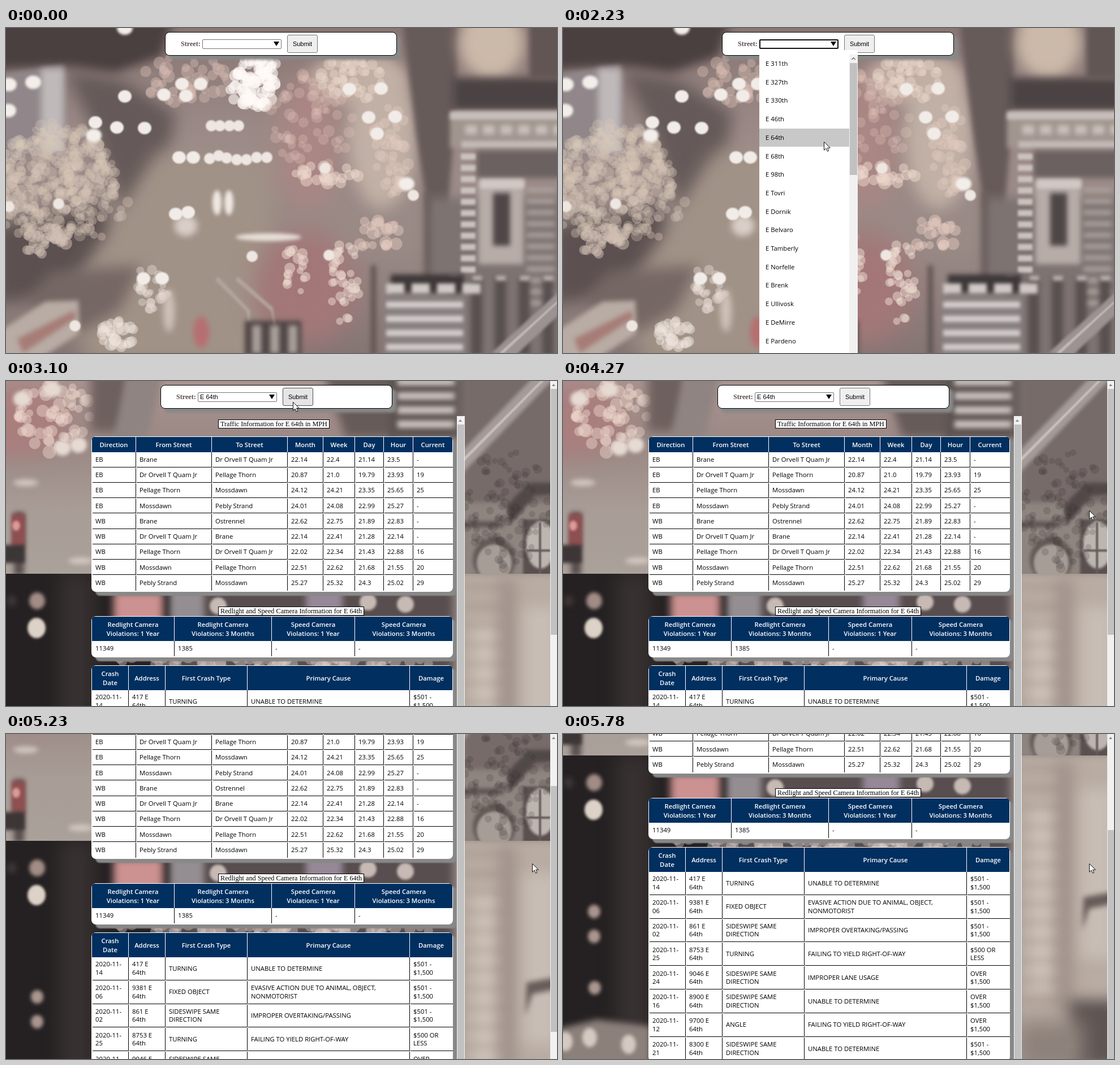
Recreate the animation shown at these times as an HTML page with a canvas. Size 974 by 575 pixels, loop 8000 ms.

```html
<!DOCTYPE html>
<html lang="en">
<head>
<meta charset="utf-8">
<title>Street traffic</title>
<style>
html, body { margin: 0; width: 100%; height: 100%; overflow: hidden; }
#stage { position: relative; width: 974px; height: 575px; overflow: hidden; background: #8d7f7d; font: 11.3px "Open Sans", "Noto Sans", sans-serif; color: #000; }
#stage div, #stage canvas, #stage svg { position: absolute; box-sizing: border-box; }
#page { left: 0; top: 0; width: 974px; height: 880px; }
#form { left: 0; top: 0; }
.panel { left: 281px; top: 7px; width: 410px; height: 42px; background: #fff; border: 1px solid #000; border-radius: 8px; box-shadow: 7px 7px 4px #888; }
.label { left: 309px; top: 20px; font: bold 12.1px/17px "Liberation Serif", serif; color: #5c4a4d; }
#select { left: 347px; top: 20px; width: 140px; height: 17px; border: 1px solid #767676; border-radius: 2px; background: #fff; padding-left: 3px; font: 11px/15px "Liberation Sans", sans-serif; }
#select.hover { border-color: #444; }
#select.focus { border: 2px solid #101010; padding-left: 2px; line-height: 13px; }
.down { left: 473px; top: 24px; border: 5.5px solid transparent; border-top: 8px solid #000; border-bottom: 0; }
#submit { left: 497px; top: 12px; width: 54px; height: 32px; border: 1px solid #767676; border-radius: 3px; background: #efefef; text-align: center; font: 11px/30px "Liberation Sans", sans-serif; }
#submit.hover { background: #e5e5e5; border-color: #4f4f4f; }
#submit.active { background: #f5f5f5; border-color: #8d8d8d; }
#list { left: 347px; top: 39px; width: 174px; height: 536px; background: #fff; }
.item { left: 0; width: 159px; height: 32.7px; padding-left: 11px; line-height: 32.7px; white-space: pre; }
.item.on { background: #c8c8c8; }
.title { left: 375px; height: 16px; border: 1px solid #000; background: #fff; padding: 0 3px; font: 12.2px/14px "Liberation Serif", serif; white-space: nowrap; }
.table { left: 151px; width: 639px; background: #fff; border-radius: 8px; overflow: hidden; box-shadow: 7px 7px 2px #888; }
.cell { display: flex; align-items: center; white-space: pre; line-height: 14.5px; padding-left: 5px; border: 0 solid #000; }
.head { justify-content: center; text-align: center; padding: 0; background: #002f60; color: #fff; font-weight: 600; line-height: 15.5px; }
.up { border: 3.5px solid transparent; border-bottom: 4px solid #8a8a8a; border-top: 0; }
.track { background: #f1f1f1; }
.thumb { background: #c1c1c1; }
</style>
</head>
<body>
<div id="stage">
  <canvas id="night" width="974" height="575"></canvas>
  <canvas id="tiled" width="974" height="880"></canvas>
  <div id="page">
    <div id="results"></div>
    <div id="form">
      <div class="panel"></div>
      <div class="label">Street:</div>
      <div id="select"></div>
      <div class="down"></div>
      <div id="submit">Submit</div>
    </div>
  </div>
  <div id="list"></div>
  <div id="bar" class="track" style="left:962px;top:0;width:12px;height:575px">
    <div class="up" style="left:3px;top:5px"></div>
    <div id="thumb" class="thumb" style="left:1px;width:11px;height:435px"></div>
  </div>
  <svg id="arrow" width="14" height="20" style="overflow:visible"><path d="M.5 .5V15.2L4 12L6.4 17.2L8.8 16.1L6.5 11.1H11.3Z" fill="#fff" stroke="#111"/></svg>
  <svg id="beam" width="10" height="16" style="overflow:visible"><g fill="none"><path id="stem" d="M-3-7Q0-7 0-5Q0-7 3-7M0-5V5M-3 7Q0 7 0 5Q0 7 3 7" stroke="#fff" stroke-width="3"/><use href="#stem" style="stroke:#000"/><path d="M-3-7Q0-7 0-5Q0-7 3-7M0-5V5M-3 7Q0 7 0 5Q0 7 3 7" stroke="#000"/></g></svg>
</div>
<script>
const $ = id => document.getElementById(id);
const STREET = 'E 64th';

// ---------- backdrops ----------
let g, seed = 7;
const rnd = () => (seed = seed * 16807 % 2147483647) / 2147483647;

function poly(blur, color, ...p) {
  g.filter = blur ? `blur(${blur}px)` : 'none';
  g.fillStyle = color;
  g.beginPath();
  for (let i = 0; i < p.length; i += 2) g.lineTo(p[i], p[i + 1]);
  g.fill();
}
const box = (blur, color, x, y, w, h) => poly(blur, color, x, y, x + w, y, x + w, y + h, x, y + h);
function discs(blur, color, rx, ry, ...p) {
  g.filter = blur ? `blur(${blur}px)` : 'none';
  g.fillStyle = color;
  for (let i = 0; i < p.length; i += 2) {
    g.beginPath();
    g.ellipse(p[i], p[i + 1], rx, ry, 0, 0, 7);
    g.fill();
  }
}
function scatter(n, color, x, y, w, h, r) {
  for (let i = 0; i < n; i++) {
    const a = rnd() * 6.283, d = Math.sqrt(rnd()), s = r * (.6 + .5 * rnd());
    discs(0, color, s, s, x + w * d * Math.cos(a), y + h * d * Math.sin(a));
  }
}
function base(h, ...colors) {
  const grad = g.createLinearGradient(0, 0, 0, h);
  colors.forEach((c, i) => grad.addColorStop(i / (colors.length - 1), c));
  g.filter = 'none';
  g.fillStyle = grad;
  g.fillRect(0, 0, 974, h);
}

function paintNight() {
  g = $('night').getContext('2d');
  base(575, '#887673', '#9c8b88', '#9a8a86', '#857573');
  // left side
  poly(9, '#4a4040', -30, -30, 300, -30, 275, 50, 190, 80, 105, 68, -30, 75);
  poly(14, '#655a59', 105, 75, 200, 90, 300, 150, 290, 210, 210, 330, 150, 170);
  poly(4, '#91878a', -9, 82, 102, 66, 104, 210, -9, 240);
  box(6, '#bfb9ba', 62, 72, 40, 150);
  poly(14, '#5c5150', -20, 350, 180, 310, 190, 370, 110, 470, -20, 490);
  // road
  poly(18, '#a19287', 270, 220, 480, 230, 450, 600, 150, 600, 100, 500);
  poly(12, '#756764', 80, 430, 240, 420, 200, 500, 130, 540, 40, 480);
  discs(22, '#aa8684', 55, 120, 535, 200);
  discs(22, '#a37778', 90, 100, 530, 460);
  discs(12, '#c3aca2', 85, 45, 620, 90);
  discs(14, '#c1b0a5', 60, 130, 665, 190);
  // right side
  poly(5, '#675b5a', 700, -20, 800, -20, 795, 150, 780, 330, 745, 320, 725, 190);
  discs(12, '#cbb9a9', 58, 65, 858, 25);
  box(7, '#4b4343', 790, 88, 200, 58);
  box(5, '#625655', 925, -20, 60, 110);
  box(9, '#7d7371', 740, 300, 250, 290);
  box(5, '#a1968f', 785, 148, 200, 64);
  box(3, '#c8bfbc', 785, 148, 200, 14);
  box(3, '#c4bab7', 805, 200, 180, 12);
  for (let x = 812; x < 974; x += 31) box(4, '#cabfba', x, 172, 21, 16);
  box(5, '#6b6160', 832, 217, 150, 48);
  box(5, '#b7aca8', 835, 268, 80, 150);
  box(3, '#d1c8c5', 838, 268, 78, 16);
  box(4, '#4f4747', 861, 292, 30, 93);
  for (let y = 222; y < 425; y += 20) {
    box(2, '#cbc2bf', 804, y, 26, 11);
    box(4, '#aaa09d', 920, y + 60, 50, 9);
  }
  for (let x = 780; x < 960; x += 42) {
    box(4, '#595050', x, 440, 20, 140);
    box(3, '#bdb2ae', x + 2, 438, 18, 9);
  }
  box(5, '#6c605e', 740, 290, 12, 160);
  box(4, '#5e5351', 645, 420, 9, 160);
  box(5, '#898080', 670, 470, 142, 120);
  box(4, '#3e3838', 680, 436, 130, 32);
  for (let x = 672; x < 815; x += 45) box(3, '#cfc8c5', x, 452, 32, 18);
  for (let y = 484; y < 575; y += 25) box(3, '#d2ccca', 672, y, 136, 11);
  poly(2, '#9c9292', 858, 575, 980, 464, 980, 505, 900, 580);
  poly(1, '#c2b9b8', 872, 575, 980, 478, 980, 482, 880, 575);
  // lower foreground
  poly(4, '#b8aca4', -9, 535, 70, 484, 128, 482, 130, 540, 60, 585, -9, 585);
  poly(4, '#a67c76', 20, 550, 120, 500, 125, 512, 30, 575);
  box(4, '#504646', 422, 518, 100, 62);
  for (let x = 435; x < 520; x += 32) box(4, '#aaa09b', x, 526, 16, 50);
  discs(5, '#b66f70', 14, 28, 345, 538);
  poly(2, '#b3a59f', 375, 440, 432, 500, 430, 520, 424, 500, 370, 446);
  poly(2, '#b3a59f', 410, 440, 472, 495, 476, 530, 468, 500, 405, 446);
  // lights
  scatter(330, 'rgba(218,202,187,.3)', 90, 272, 105, 105, 10);
  scatter(90, 'rgba(208,190,177,.4)', 100, 300, 118, 92, 9);
  scatter(26, 'rgba(210,192,180,.5)', 65, 375, 50, 25, 10);
  scatter(45, 'rgba(218,190,180,.4)', 310, 90, 85, 45, 11);
  scatter(55, 'rgba(255,250,247,.6)', 437, 105, 44, 36, 12);
  scatter(25, 'rgba(255,250,247,.5)', 440, 66, 40, 12, 9);
  scatter(60, 'rgba(225,195,187,.3)', 540, 165, 75, 85, 10);
  scatter(45, 'rgba(232,214,202,.45)', 610, 90, 55, 45, 10);
  scatter(45, 'rgba(225,203,190,.4)', 680, 220, 35, 80, 10);
  scatter(22, 'rgba(238,215,203,.5)', 570, 260, 70, 20, 11);
  scatter(35, 'rgba(238,220,208,.5)', 598, 450, 28, 72, 9);
  scatter(18, 'rgba(238,220,208,.5)', 512, 430, 24, 42, 9);
  scatter(22, 'rgba(230,205,193,.45)', 655, 365, 42, 30, 11);
  scatter(30, 'rgba(235,225,218,.4)', 258, 460, 32, 42, 9);
  scatter(24, 'rgba(240,230,222,.5)', 196, 545, 32, 28, 11);
  discs(6, '#d9cfc8', 20, 18, 318, 350);
  discs(3, '#e6ddd6', 58, 7, 464, 370);
  discs(6, '#cfc2b9', 10, 38, 288, 500);
  discs(3, '#eee7e2', 8, 22, 373, 309, 394, 309);
  discs(1, '#f2ece8', 12, 11, 210, 121, 279, 118, 318, 120, 311, 99, 344, 99, 158, 167, 196, 176, 245, 177,
    663, 107, 641, 158, 688, 157, 656, 187, 607, 108, 306, 229, 331, 229, 276, 443, 243, 443, 300, 329, 322, 326);
  discs(1, '#eee6e1', 10, 10, 363, 173, 378, 173, 395, 173, 411, 173, 360, 231, 376, 226, 390, 230, 408, 233, 425, 233,
    443, 229, 461, 229, 564, 248, 435, 404, 571, 402, 720, 296, 5, 316, 93, 311, 122, 527);
  discs(2, '#f3eeea', 14, 12, 5, 100, 48, 96, 4, 146, 155, 190, 708, 276, 210, 0);
}

function paintTiled() {
  g = $('tiled').getContext('2d');
  // lower end of the photo
  base(341, '#a8938f', '#9a8884', '#a89c96', '#aaa19a');
  discs(18, '#a97f7e', 95, 65, 20, 70);
  scatter(55, 'rgba(238,215,205,.45)', 85, 60, 65, 70, 11);
  discs(3, '#e6dad3', 15, 14, 28, 32, 100, 118, 128, 113, 82, 15);
  box(9, '#6d605e', 150, -20, 70, 110);
  poly(8, '#665b59', 560, -20, 690, -20, 690, 100, 600, 100);
  poly(6, '#8f8481', 215, -20, 280, -20, 250, 100, 190, 100);
  box(4, '#5e5553', 675, -20, 140, 120);
  for (let y = -5; y < 95; y += 25) box(4, '#cac2be', 692, y, 102, 13);
  poly(10, '#776b69', 800, -20, 980, -20, 980, 360, 800, 360);
  poly(3, '#a59b98', 805, 125, 935, -10, 974, -10, 805, 165);
  poly(1, '#cbc3c0', 805, 140, 950, -5, 955, -5, 805, 147);
  box(5, '#8f8580', 805, 215, 160, 130);
  poly(3, '#514948', 885, 220, 925, 180, 975, 180, 975, 200, 935, 203, 890, 255);
  box(3, '#605654', 805, 248, 75, 11);
  discs(3, '#635957', 38, 40, 863, 316);
  discs(2, '#a69d97', 31, 33, 863, 322);
  box(2, '#5a504f', 914, 245, 50, 100);
  discs(2, '#bcb5b0', 26, 42, 945, 290);
  box(1, '#655d5b', 942, 250, 4, 95);
  box(1, '#655d5b', 920, 298, 42, 4);
  scatter(90, 'rgba(50,43,42,.18)', 890, 225, 80, 110, 8);
  box(5, '#594f4e', 14, 232, 18, 112);
  box(3, '#8e4f50', 10, 235, 24, 58);
  discs(2, '#dc9b98', 7, 9, 18, 256);
  box(3, '#3d3636', -5, 290, 38, 32);
  discs(4, '#d2c8c0', 22, 6, 35, 180, 132, 318);
  // next repeat starts here
  g.save();
  g.beginPath();
  g.rect(0, 341, 974, 539);
  g.clip();
  box(0, '#252122', 0, 341, 974, 539);
  box(15, '#383131', 95, 341, 60, 539);
  box(9, '#584e4f', 300, 320, 520, 220);
  box(7, '#cc9291', 190, 372, 88, 60);
  box(6, '#948d92', 290, 365, 60, 60);
  box(6, '#968897', 530, 365, 65, 60);
  discs(2, '#c7bab4', 15, 15, 375, 398, 640, 391, 706, 395);
  scatter(65, 'rgba(225,205,198,.4)', 480, 493, 310, 16, 13);
  box(10, '#b9aca3', 795, 330, 200, 570);
  box(14, '#cec3b9', 825, 430, 45, 330);
  box(13, '#9e918a', 874, 350, 28, 450);
  box(12, '#c7bdb4', 915, 400, 60, 300);
  poly(5, '#675c59', 920, 592, 975, 582, 975, 603, 930, 612, 918, 650);
  box(12, '#5e5452', 895, 773, 90, 120);
  box(18, '#8d817b', 800, 810, 120, 90);
  for (let y = 360; y < 800; y += 34) box(8, 'rgba(120,105,98,.25)', 810, y, 70, 9);
  discs(3, '#a28c86', 14, 15, 55, 389);
  discs(2, '#ddd2c7', 16, 18, 54, 437);
  discs(3, '#aa968f', 11, 12, 55, 617, 55, 661, 56, 752);
  discs(4, '#3c3535', 9, 10, 10, 389);
  poly(6, '#8c807b', -10, 825, 60, 808, 155, 820, 155, 900, -10, 900);
  discs(3, '#d5cac2', 13, 17, 4, 847, 47, 840, 116, 852);
  g.restore();
}

// ---------- page content ----------
function add(parent, cls, style, text = '') {
  const el = document.createElement('div');
  el.className = cls;
  for (const k in style) el.style[k] = typeof style[k] === 'number' ? style[k] + 'px' : style[k];
  el.textContent = text;
  parent.append(el);
  return el;
}

function table(top, edges, headH, rowH, head, rows) {
  const t = add($('results'), 'table', { top, height: 2 + headH + rows.length * rowH });
  const last = head.length - 1;
  head.forEach((text, c) => add(t, 'cell head',
    { left: edges[c] - 151, top: 1, width: edges[c + 1] - edges[c] - 1, height: headH }, text));
  rows.forEach((row, r) => row.forEach((text, c) => add(t, 'cell', {
    left: edges[c] - 150, top: 1 + headH + r * rowH,
    width: edges[c + 1] - edges[c] - 1, height: rowH - 1,
    borderRightWidth: c < last ? 1 : 0, borderBottomWidth: r < rows.length - 1 ? 1 : 0
  }, text)));
}

const KING = 'Dr Orvell T Quam Jr', GROVE = 'Pellage Thorn', LAWN = 'Mossdawn', STONY = 'Pebly Strand', MAIN = 'Brane';
const split = lines => lines.map(s => s.split('|'));

function buildResults() {
  add($('results'), 'title', { top: 68 }, `Traffic Information for ${STREET} in MPH`);
  table(98, [152, 230, 364, 498, 561, 617, 668, 720, 790], 27.4, 27.25,
    ['Direction', 'From Street', 'To Street', 'Month', 'Week', 'Day', 'Hour', 'Current'],
    split([
      `EB|${MAIN}|${KING}|22.14|22.4|21.14|23.5|-`,
      `EB|${KING}|${GROVE}|20.87|21.0|19.79|23.93|19`,
      `EB|${GROVE}|${LAWN}|24.12|24.21|23.35|25.65|25`,
      `EB|${LAWN}|${STONY}|24.01|24.08|22.99|25.27|-`,
      `WB|${MAIN}|Ostrennel|22.62|22.75|21.89|22.83|-`,
      `WB|${KING}|${MAIN}|22.14|22.41|21.28|22.14|-`,
      `WB|${GROVE}|${KING}|22.02|22.34|21.43|22.88|16`,
      `WB|${LAWN}|${GROVE}|22.51|22.62|21.68|21.55|20`,
      `WB|${STONY}|${LAWN}|25.27|25.32|24.3|25.02|29`
    ]));
  add($('results'), 'title', { top: 399 }, `Redlight and Speed Camera Information for ${STREET}`);
  table(416, [152, 298, 470, 617, 790], 43, 27.5,
    ['Redlight Camera\nViolations: 1 Year', 'Redlight Camera\nViolations: 3 Months',
      'Speed Camera\nViolations: 1 Year', 'Speed Camera\nViolations: 3 Months'],
    split(['11349|1385|-|-']));
  const swipe = 'SIDESWIPE SAME\nDIRECTION', mid = '$501 -\n$1,500', over = 'OVER\n$1,500';
  const crashes = split([
    `14|417|TURNING|UNABLE TO DETERMINE|${mid}`,
    `06|9381|FIXED OBJECT|EVASIVE ACTION DUE TO ANIMAL, OBJECT,\nNONMOTORIST|${mid}`,
    `02|861|${swipe}|IMPROPER OVERTAKING/PASSING|${mid}`,
    `25|8753|TURNING|FAILING TO YIELD RIGHT-OF-WAY|$500 OR\nLESS`,
    `24|9046|${swipe}|IMPROPER LANE USAGE|${over}`,
    `16|8900|${swipe}|UNABLE TO DETERMINE|${over}`,
    `12|9700|ANGLE|FAILING TO YIELD RIGHT-OF-WAY|${over}`,
    `21|8300|${swipe}|UNABLE TO DETERMINE|${mid}`
  ]).map(([day, no, ...rest]) => ['2020-11-\n' + day, `${no} ${STREET.replace(' ', '\n')}`, ...rest]);
  table(503, [152, 217, 282, 427, 714, 790], 43, 41.8,
    ['Crash\nDate', 'Address', 'First Crash Type', 'Primary Cause', 'Damage'], crashes);
  const bar = add($('results'), 'track', { left: 797, top: 62, width: 14, height: 818 });
  add(bar, 'up', { left: 3, top: 6 });
  add(bar, 'thumb', { left: 1, top: 15, width: 12, height: 803 });
}

const ROW = 32.7, LIST_TOP = 47;
const items = ['311th', '327th', '330th', '46th', '64th', '68th', '98th', 'Tovri', 'Dornik', 'Belvaro', 'Tamberly',
  'Norfelle', 'Brenk', 'Ullivosk', 'DeMirre', 'Pardeno']
  .map((s, i) => add($('list'), 'item', { top: LIST_TOP - 39 + i * ROW }, 'E ' + s));
const side = add($('list'), 'track', { left: 159, top: 8, width: 15, height: 528 });
add(side, 'thumb', { left: 1, top: 15, width: 13, height: 198 });
const caret = add(side, '', { left: 5, top: 6, width: 5, height: 5, transform: 'rotate(45deg)' });
caret.style.borderTop = caret.style.borderLeft = '1.3px solid #444';

// ---------- timeline ----------
const LOOP = 8000;
const moves = [
  [350, 880, 8, [[806, 560], [640, 250], [484, 30], [530, 54]]],
  [1030, 1260, 4, [[530, 54], [480, 27]]],
  [1930, 2230, 5, [[480, 27], [461, 201]]],
  [2380, 2780, 6, [[461, 201], [507, 37]]],
  [3400, 3800, 6, [[507, 37], [930, 229]]]
];
const scrolls = [[0, 0], [5070, 45], [5150, 112], [5230, 152], [5630, 197], [5700, 264], [5780, 303]];
const latest = (list, t) => list.filter(e => t >= e[0]).pop();

function pointer(t) {
  const m = latest(moves, t);
  if (!m) return null;
  const [from, to, n, pts] = m;
  const k = Math.min(n - 1, Math.floor((t - from) / (to - from) * (n - 1) + .03));
  let u = from === 350 ? k / (n - 1) : (k + 1) / n;
  if (pts.length === 2) u = u * u * (3 - 2 * u);
  const s = u * (pts.length - 1), i = Math.min(pts.length - 2, Math.floor(s));
  return [0, 1].map(c => pts[i][c] + (pts[i + 1][c] - pts[i][c]) * (s - i));
}
const within = (p, x, y, w, h) => !!p && p[0] >= x && p[0] < x + w && p[1] >= y && p[1] < y + h;
const show = (el, on) => { el.style.display = on ? 'block' : 'none'; };

function place(el, p, on) {
  show(el, on);
  if (on) el.style.transform = `translate(${Math.round(p[0])}px,${Math.round(p[1])}px)`;
}

function draw(t) {
  const loaded = t >= 3100, open = t >= 1620 && t < 2380, y = latest(scrolls, t)[1];
  const p = pointer(t), dx = loaded ? -8 : 0;
  const visible = !!p && !(t >= 4200 && t < 4270);

  show($('night'), !loaded);
  for (const id of ['tiled', 'results', 'bar']) show($(id), loaded);
  $('tiled').style.transform = $('page').style.transform = `translateY(${-y}px)`;
  $('form').style.transform = `translateX(${dx}px)`;
  $('thumb').style.top = 14 + y * .515 + 'px';

  const onSelect = within(p, 347 + dx, 20, 140, 17) && y === 0;
  const focus = t >= 1530 && t < 2380;
  $('select').className = focus ? 'focus' : onSelect ? 'hover' : '';
  $('select').textContent = t >= 2380 ? STREET : '';
  $('submit').className = t >= 2930 && !loaded ? 'active' : within(p, 497 + dx, 12, 54, 32) ? 'hover' : '';

  show($('list'), open);
  const hot = open && p[1] >= LIST_TOP ? Math.floor((p[1] - LIST_TOP) / ROW) : -1;
  items.forEach((el, i) => el.classList.toggle('on', i === hot));

  place($('beam'), p && [p[0] + 1, p[1]], visible && onSelect);
  place($('arrow'), p, visible && !onSelect);
}

paintNight();
paintTiled();
buildResults();
function tick() {
  draw(performance.now() % LOOP);
  requestAnimationFrame(tick);
}
tick();
</script>
</body>
</html>
```
